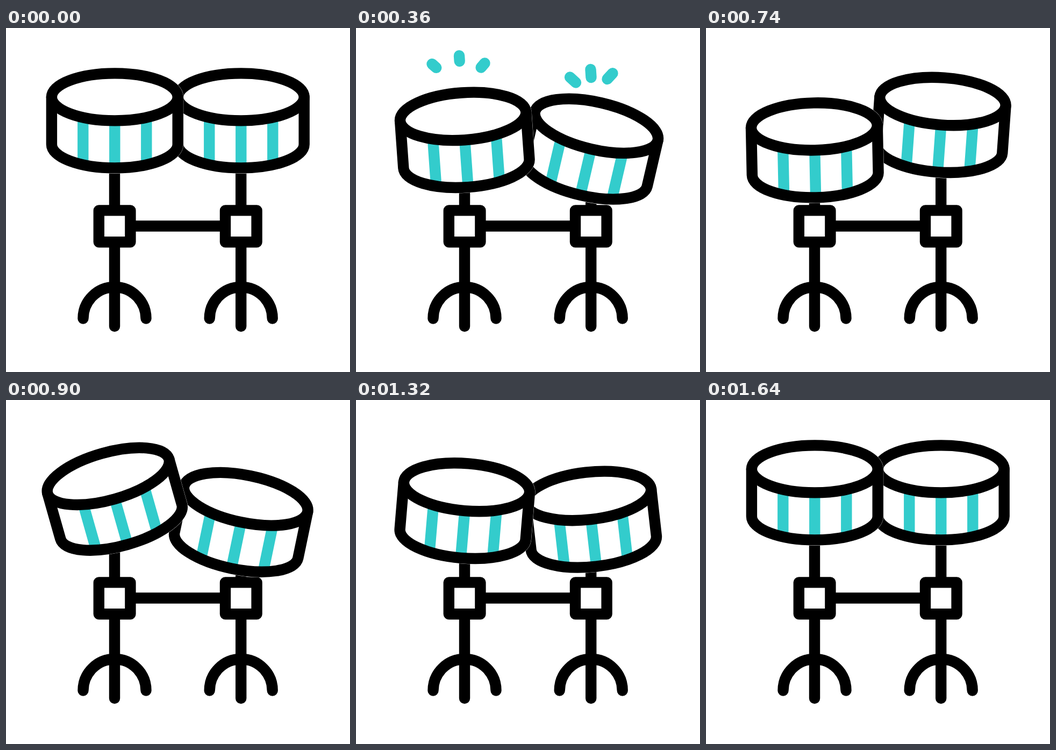
Animation of 640x640 px, one loop 1.8 s. Source, as an HTML page:

```html
<!DOCTYPE html>
<html lang="en">
<head>
<meta charset="utf-8">
<title>Bouncing drums</title>
<style>
  html, body { margin: 0; width: 100%; height: 100%; overflow: hidden; background: #fff; }
  svg { display: block; width: 100%; height: 100%; }
  .ink { fill: none; stroke: #000; stroke-width: 20.4; stroke-linecap: round; stroke-linejoin: round; }
  .paper { fill: #fff; }
  .halo { fill: #fff; stroke: #fff; stroke-width: 21; stroke-linejoin: round; }
  .teal { fill: none; stroke: #3cc; stroke-width: 20.4; }
  .spark { stroke-linecap: round; }
</style>
</head>
<body>
<svg viewBox="0 0 640 640">
  <defs>
    <g id="stand" class="ink">
      <path d="M202 250V339M202 398V555M143.5 540.5A58.5 58.5 0 0 1 260.5 540.5"/>
      <rect class="paper" x="172.8" y="339.4" width="58.6" height="58.8"/>
    </g>
    <!-- Centred on the pivot -->
    <g id="drum">
      <path class="halo" d="M-117.4 -44V44A117.4 44 0 0 0 117.4 44V-44A117.4 44 0 0 0 -117.4 -44Z"/>
      <path class="teal" d="M-59 -20V78M0 -20V80M59 -20V78"/>
      <path class="ink" d="M-117.4 -44V44A117.4 44 0 0 0 117.4 44V-44"/>
      <ellipse class="ink paper" cy="-44" rx="117.4" ry="44"/>
    </g>
  </defs>
  <path class="ink" d="M231 368.5H408"/>
  <use href="#stand"/>
  <use href="#stand" x="235.2"/>
  <use href="#drum" id="right"/>
  <use href="#drum" id="left"/>
  <g id="sparks"></g>
</svg>
<script>
const LOOP = 1800;
const PIVOT_Y = 172.4;

// Keys are [time, value] pairs
const drums = [
  {
    el: document.getElementById('left'), x: 202.3, sparkStart: 110,
    drop: [[0, 0], [260, 56], [507, 0], [745, 55], [970, 0], [1180, 55], [1510, 0]],
    tilt: [[0, 0], [270, -11], [560, 20], [885, -16], [1200, 10], [1490, -4], [1610, 0]],
    sparks: [[163.5, 86.5, 141.5, 67], [194, 80.5, 192, 51.5], [220, 88, 239.5, 65.5]]
  },
  {
    el: document.getElementById('right'), x: 437.3, sparkStart: 280,
    drop: [[130, 0], [395, 55], [690, 0], [895, 55], [1165, 0], [1360, 55], [1640, 0]],
    tilt: [[80, 0], [300, 17], [590, -20], [827, 14], [1215, -12], [1480, 4], [1640, 0]],
    sparks: [[409, 101.5, 387.5, 82], [437.5, 92, 435.5, 62.5], [467.5, 95, 487, 74]]
  }
];

const clamp = v => Math.min(1, Math.max(0, v));
const ease = v => (1 - Math.cos(Math.PI * clamp(v))) / 2;
const mix = (a, b, f) => a + (b - a) * f;

function track(keys, t) {
  const i = keys.findIndex(k => k[0] > t);
  if (i === 0) return keys[0][1];
  if (i < 0) return keys[keys.length - 1][1];
  const [t0, v0] = keys[i - 1], [t1, v1] = keys[i];
  return mix(v0, v1, ease((t - t0) / (t1 - t0)));
}

for (const drum of drums) {
  drum.lines = drum.sparks.map(() => {
    const line = document.createElementNS('http://www.w3.org/2000/svg', 'path');
    line.setAttribute('class', 'teal spark');
    document.getElementById('sparks').append(line);
    return line;
  });
}

function drawSparks(drum, t) {
  const age = t - drum.sparkStart;
  const head = ease(age / 160);
  const tail = ease((age - 150) / 170);
  const visible = age > 0 && age < 320;
  drum.sparks.forEach(([x0, y0, x1, y1], i) => {
    const at = f => mix(x0, x1, f) + ' ' + mix(y0, y1, f);
    drum.lines[i].setAttribute('d', visible ? `M${at(tail)}L${at(head)}` : '');
  });
}

function draw(t) {
  for (const drum of drums) {
    const y = PIVOT_Y + track(drum.drop, t);
    drum.el.setAttribute('transform', `translate(${drum.x} ${y}) rotate(${track(drum.tilt, t)})`);
    drawSparks(drum, t);
  }
}

const start = performance.now();
function tick() {
  draw((performance.now() - start) % LOOP);
  requestAnimationFrame(tick);
}
draw(0);
requestAnimationFrame(tick);
</script>
</body>
</html>
```
